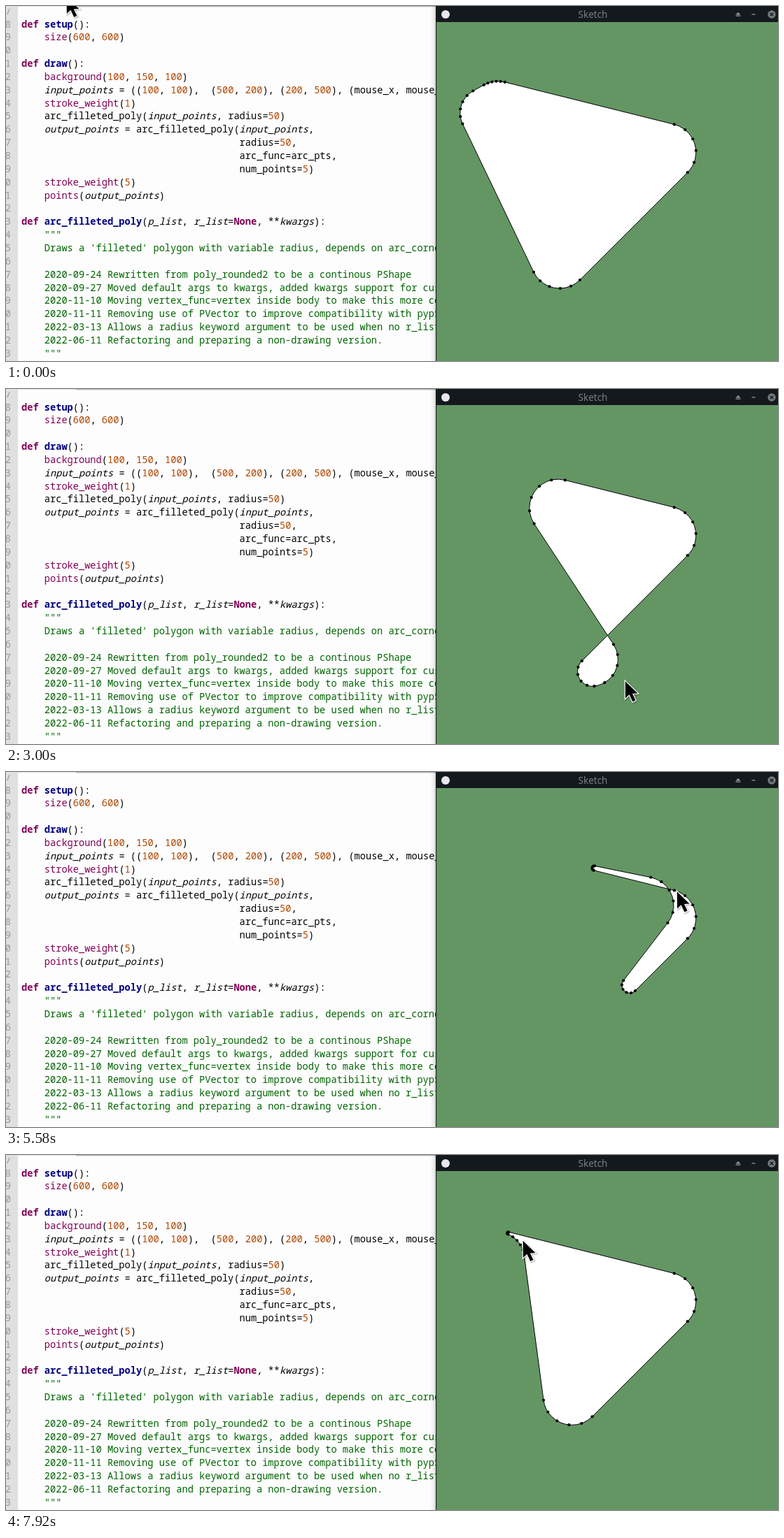
Recreate the animation shown at these times as an HTML page with a canvas. Size 1103x508 px, loop 8 s.

```html
<!DOCTYPE html>
<html lang="en">
<head>
<meta charset="utf-8">
<title>Filleted polygon</title>
<style>
html, body { margin: 0; width: 100%; height: 100%; overflow: hidden; background: #fdfdfd; }
canvas { display: block; }
</style>
</head>
<body>
<canvas id="stage" width="1103" height="508"></canvas>
<script>
const ctx = document.getElementById('stage').getContext('2d');
const W = 1103, H = 508, LOOP = 8000, FPS = 12;
const WIN_X = 615, WIN_Y = 23, SCALE = 0.82, RADIUS = 50 * SCALE;
const MONO = '"Noto Sans Mono", "DejaVu Sans Mono", monospace';
const CHAR_W = 8.2, FONT_PX = CHAR_W / 0.6, LINE_H = 18.85, BASE_Y = 30.5, TEXT_X = 22;

const CODE = `def setup():
    size(600, 600)

def draw():
    background(100, 150, 100)
    input_points = ((100, 100),  (500, 200), (200, 500), (mouse_x, mouse_y))
    stroke_weight(1)
    arc_filleted_poly(input_points, radius=50)
    output_points = arc_filleted_poly(input_points,
                                      radius=50,
                                      arc_func=arc_pts,
                                      num_points=5)
    stroke_weight(5)
    points(output_points)

def arc_filleted_poly(p_list, r_list=None, **kwargs):
    """
    Draws a 'filleted' polygon with variable radius, depends on arc_corner

    2020-09-24 Rewritten from poly_rounded2 to be a continous PShape
    2020-09-27 Moved default args to kwargs, added kwargs support for custom
    2020-11-10 Moving vertex_func=vertex inside body to make this more compact
    2020-11-11 Removing use of PVector to improve compatibility with pyp5js
    2022-03-13 Allows a radius keyword argument to be used when no r_list
    2022-06-11 Refactoring and preparing a non-drawing version.
    """`.split('\n');
const DOC_START = 16;
const PURPLE = '#7f0055', NAVY = '#00007f', GREEN = '#006400', ORANGE = '#b04600';
const BUILTINS = ['size', 'background', 'stroke_weight', 'points'];
const LOCALS = ['input_points', 'output_points', 'p_list', 'r_list', 'kwargs'];

// Hand strokes: smooth curves through evenly timed points, with rests between.
// Times are in steps of 1/12 s.
const stroke = (from, to, ...pts) => ({ from, to, pts });
const STROKES = [
  stroke(7.5, 27.5, [553, 88], [672, 95], [815, 84], [990, 78], [1046, 68], [1053, 238]),
  stroke(31.5, 41.5, [1053, 238], [955, 395], [865, 418], [755, 410], [686, 394]),
  stroke(41.5, 50.5, [686, 394], [790, 264], [857, 216], [874, 207]),
  stroke(52.5, 60.5, [874, 207], [940, 197], [1020, 182], [1083, 165], [1066, 144]),
  stroke(64.5, 70.5, [1066, 144], [794, 211]),
  stroke(72.5, 78.5, [794, 211], [765, 118], [700, 65], [682, 51]),
  stroke(80.5, 95, [682, 51], [722, 112], [738, 122])
];

function pointer(step) {
  const s = STROKES.findLast(s => s.from <= step) || STROKES[0];
  const last = s.pts.length - 1;
  const t = Math.min(1, Math.max(0, (step - s.from) / (s.to - s.from))) * last;
  const i = Math.min(last - 1, Math.floor(t)), u = t - i;
  const [a, b, c, d] = [-1, 0, 1, 2].map(k => s.pts[Math.min(last, Math.max(0, i + k))]);
  return [0, 1].map(k =>
    b[k] + (c[k] - b[k]) * u * u * (3 - 2 * u) +
    u * (1 - u) * ((c[k] - a[k]) * (1 - u) - (d[k] - b[k]) * u) / 2);
}

const toStage = (x, y) => [WIN_X + x * SCALE, WIN_Y + y * SCALE];
const mid = (a, b) => [(a[0] + b[0]) / 2, (a[1] + b[1]) / 2];

// Arc rounding corner p, limited to the half edges on both sides
function fillet(prev, p, next) {
  const a = mid(prev, p), b = mid(p, next);
  const ux = a[0] - p[0], uy = a[1] - p[1], vx = b[0] - p[0], vy = b[1] - p[1];
  const lu = Math.hypot(ux, uy) || 1e-6, lv = Math.hypot(vx, vy) || 1e-6;
  const t = Math.max(1e-6, Math.abs(Math.tan((Math.atan2(uy, ux) - Math.atan2(vy, vx)) / 2)));
  const seg = Math.min(RADIUS / t, lu, lv), r = seg * t;
  const bx = ux / lu + vx / lv, by = uy / lu + vy / lv;
  const d = Math.hypot(seg, r) / (Math.hypot(bx, by) || 1e-6);
  const x = p[0] + bx * d, y = p[1] + by * d;
  const angle = (dx, dy, l) => Math.atan2(p[1] + dy / l * seg - y, p[0] + dx / l * seg - x);
  const start = angle(ux, uy, lu);
  let sweep = angle(vx, vy, lv) - start;
  if (sweep > Math.PI) sweep -= 2 * Math.PI;
  if (sweep < -Math.PI) sweep += 2 * Math.PI;
  return { x, y, r, start, sweep };
}

function drawPolygon(mouse) {
  const pts = [toStage(100, 100), toStage(500, 200), toStage(200, 500), mouse];
  const arcs = pts.map((p, i) => fillet(pts[(i + 3) % 4], p, pts[(i + 1) % 4]));
  ctx.beginPath();
  for (const a of arcs) ctx.arc(a.x, a.y, a.r, a.start, a.start + a.sweep, a.sweep < 0);
  ctx.closePath();
  ctx.fillStyle = '#fff';
  ctx.fill();
  ctx.strokeStyle = '#000';
  ctx.lineWidth = 1;
  ctx.lineJoin = 'round';
  ctx.stroke();
  ctx.fillStyle = '#000';
  for (const a of arcs) {
    for (let i = 0; i <= 5; i++) {
      const w = a.start + a.sweep * i / 5;
      disc(a.x + a.r * Math.cos(w), a.y + a.r * Math.sin(w), 2.1);
    }
  }
}

function rect(color, x, y, w, h) {
  ctx.fillStyle = color;
  ctx.fillRect(x, y, w, h);
}

function disc(x, y, r) {
  ctx.beginPath();
  ctx.arc(x, y, r, 0, 2 * Math.PI);
  ctx.fill();
}

function polyline(...p) {
  ctx.beginPath();
  for (let i = 0; i < p.length; i += 2) ctx.lineTo(p[i], p[i + 1]);
}

function styleOf(token, afterDef) {
  if (token === 'def' || token === 'None') return ['bold', PURPLE];
  if (afterDef) return ['bold', NAVY];
  if (BUILTINS.includes(token)) return ['500', PURPLE];
  if (LOCALS.includes(token)) return ['italic 500', '#000'];
  if (/^\d+$/.test(token)) return ['500', ORANGE];
  return ['500', '#000'];
}

function drawToken(text, col, y, [style, color]) {
  ctx.font = `${style} ${FONT_PX}px ${MONO}`;
  ctx.fillStyle = color;
  ctx.fillText(text, TEXT_X + col * CHAR_W, y);
}

function drawEditor() {
  rect('#fdfdfd', 0, 0, W, H);
  rect('#e0e0e0', 0, 0, 17, H);
  ctx.save();
  ctx.beginPath();
  ctx.rect(0, 4, WIN_X, H);
  ctx.clip();
  ctx.textAlign = 'right';
  ctx.font = `${FONT_PX}px ${MONO}`;
  ctx.fillStyle = '#999';
  for (let n = 7; n <= 33; n++) ctx.fillText(n % 10, 7, BASE_Y + (n - 8) * LINE_H);
  ctx.textAlign = 'left';
  CODE.forEach((line, i) => {
    const y = BASE_Y + i * LINE_H;
    if (i >= DOC_START) {
      drawToken(line.trim(), 4, y, ['500', GREEN]);
      return;
    }
    let before = '';
    for (const m of line.matchAll(/\w+|[^\w\s]+/g)) {
      drawToken(m[0], m.index, y, styleOf(m[0], before === 'def'));
      before = m[0];
    }
  });
  ctx.restore();
  rect('#e4e2e0', 0, 0, 100, 1);
  rect('#b5b2ae', 100, 0, WIN_X - 100, 1.3);
}

function drawWindow() {
  const shade = ctx.createLinearGradient(WIN_X - 9, 0, WIN_X, 0);
  shade.addColorStop(0, 'rgba(0,0,0,0)');
  shade.addColorStop(0.6, 'rgba(0,0,0,0.07)');
  shade.addColorStop(1, 'rgba(0,0,0,0.25)');
  rect(shade, WIN_X - 9, 0, 9, H);
  rect('#649664', WIN_X, WIN_Y, W - WIN_X, H - WIN_Y);
  rect('#13191c', WIN_X - 1, 0, W - WIN_X + 1, WIN_Y);
  rect('#20302a', WIN_X - 1, WIN_Y, 1.2, H);
  ctx.fillStyle = '#e6e6ec';
  disc(628, 12, 6);
  ctx.font = '13.5px "Noto Sans", "Open Sans", sans-serif';
  ctx.textAlign = 'center';
  ctx.fillStyle = '#7a8184';
  ctx.fillText('Sketch', 838.5, 16.5);
  ctx.textAlign = 'left';
  ctx.fillStyle = '#9a9fa2';
  polyline(1042.5, 12.5, 1046, 9, 1049.5, 12.5);
  ctx.fill();
  ctx.fillRect(1042.5, 13.5, 7, 1.2);
  ctx.fillRect(1065.5, 11.3, 5, 1.2);
  ctx.fillStyle = '#747b7e';
  disc(1094, 12, 5.7);
  ctx.strokeStyle = '#13191c';
  ctx.lineWidth = 1.3;
  for (const k of [-2.3, 2.3]) {
    polyline(1094 - k, 9.7, 1094 + k, 14.3);
    ctx.stroke();
  }
}

function drawArrow(x, y) {
  ctx.save();
  ctx.translate(x, y);
  ctx.shadowColor = 'rgba(0,0,0,0.35)';
  ctx.shadowBlur = 2;
  ctx.shadowOffsetX = ctx.shadowOffsetY = 1;
  polyline(0.6, 0.8, 0.8, 25, 6.4, 19.8, 11.2, 30, 15.4, 28, 10.8, 18.4, 18.4, 18);
  ctx.closePath();
  ctx.lineJoin = 'miter';
  ctx.strokeStyle = '#fff';
  ctx.lineWidth = 2.4;
  ctx.stroke();
  ctx.shadowColor = 'transparent';
  ctx.fillStyle = '#000';
  ctx.fill();
  ctx.restore();
}

function drawBeam(x, y) {
  for (const [color, width] of [['#fff', 4], ['#111', 2]]) {
    ctx.strokeStyle = color;
    ctx.lineWidth = width;
    polyline(x, y - 12, x, y + 12);
    ctx.stroke();
    for (const e of [-12, 12]) {
      polyline(x - 5, y + e, x + 5, y + e);
      ctx.stroke();
    }
  }
}

function draw(ms) {
  const step = Math.floor(ms * FPS / 1000 + 0.05);
  drawEditor();
  drawWindow();
  // The sketch reads the pointer half a step late, and only inside its window
  const seen = pointer(step - 0.5);
  drawPolygon(seen[0] >= WIN_X ? seen : [637.7, 138]);
  const [x, y] = pointer(step);
  if (step < 6) drawArrow(86, -14);
  else if (x < WIN_X) drawBeam(x, y);
  else drawArrow(x, y);
}

const begin = performance.now();
function tick() {
  draw((performance.now() - begin) % LOOP);
  requestAnimationFrame(tick);
}
tick();
</script>
</body>
</html>
```
